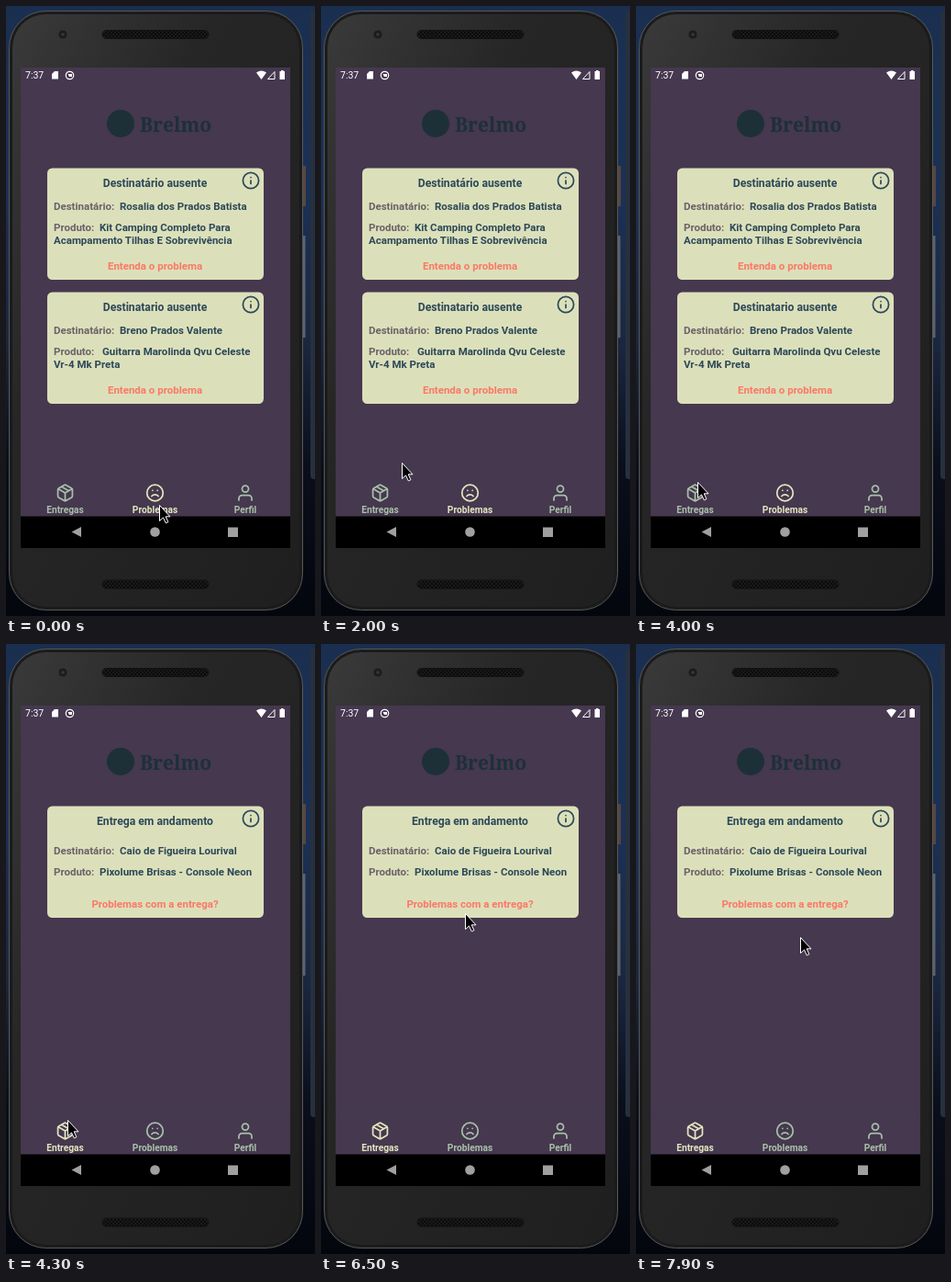
An HTML page for the animation above (8 s loop, 337 by 664 pixels).

```html
<!DOCTYPE html>
<html lang="pt">
<head>
<meta charset="utf-8">
<style>
html, body { margin: 0; width: 100%; height: 100%; overflow: hidden; background: #060b16; }
svg { display: block; }
text { font: bold 11.5px Roboto, sans-serif; fill: #2c4859; }
.title { font-size: 12.2px; text-anchor: middle; }
.label { fill: #6a6169; }
.link { fill: #fb7867; text-anchor: middle; }
.tab text { font-size: 10.2px; text-anchor: middle; fill: currentColor; }
.clock { font-weight: 400; font-size: 10.5px; fill: #fff; }
.brand { font: 900 21px "Noto Serif", serif; fill: #1d3038; }
.icon { fill: none; stroke: currentColor; stroke-width: 2; stroke-linecap: round; stroke-linejoin: round; }
</style>
</head>
<body>
<svg width="337" height="664" viewBox="0 0 337 664">
  <defs>
    <linearGradient id="sky" x2="0" y2="1">
      <stop stop-color="#1a2f50"/>
      <stop offset=".3" stop-color="#1b3155"/>
      <stop offset=".55" stop-color="#1b2740"/>
      <stop offset=".75" stop-color="#0a0f1b"/>
      <stop offset="1" stop-color="#03060d"/>
    </linearGradient>
    <linearGradient id="shell" x2="1" y2="1">
      <stop stop-color="#3a3a3a"/>
      <stop offset=".35" stop-color="#262626"/>
      <stop offset="1" stop-color="#1f1f1f"/>
    </linearGradient>
    <pattern id="mesh" width="4" height="4" patternUnits="userSpaceOnUse">
      <path d="M0 0h2v2h-2zM2 2h2v2h-2z" fill="#0b0b0b"/>
    </pattern>
  </defs>

  <rect width="337" height="664" fill="url(#sky)"/>
  <rect x="332" y="5" width="12" height="510" rx="4" fill="#26303f"/>
  <path d="M324 174h3v44h-3z" fill="#57473f"/>
  <path d="M324 250h2.5v111h-2.5z" fill="#5c636d"/>
  <rect x="3.500" y="5.500" width="320" height="652" rx="40" fill="#1c1c1c" stroke="#585858"/>
  <rect x="6.500" y="8.500" width="314" height="646" rx="37" fill="url(#shell)" stroke="#191919"/>
  <circle cx="62" cy="31" r="5" fill="#1c1c1c" stroke="#343434"/>
  <circle cx="62" cy="31" r="1.800" fill="#36383e"/>
  <g fill="#1a1a1a" stroke="#111">
    <rect x="105" y="26.500" width="116" height="9" rx="4.500"/>
    <rect x="105" y="625" width="116" height="9" rx="4.500"/>
  </g>
  <rect x="106" y="27" width="114" height="8" rx="4" fill="url(#mesh)"/>
  <rect x="106" y="626" width="114" height="8" rx="4" fill="url(#mesh)"/>

  <rect x="16" y="67" width="294" height="489" fill="#45384f"/>
  <rect x="16" y="515.500" width="294" height="1" fill="#413a52"/>
  <rect x="16" y="555.500" width="294" height="34.500"/>
  <g fill="#a0a0a0">
    <path d="M82 567v11l-10.500-5.500z"/>
    <circle cx="162.500" cy="572.500" r="5.300"/>
    <path d="M242 567.500h11v10.500h-11z"/>
  </g>

  <text class="clock" x="21" y="79">7:37</text>
  <g fill="#fff">
    <path d="M53 71h4v8.500h-7v-5.500z"/>
    <circle cx="69.500" cy="75.500" r="4.200" fill="none" stroke="#fff" stroke-width="1.200"/>
    <path d="M67.500 74h4.500v3h-3z"/>
    <path d="M273 72.500q5.500-4 11 0l-5.500 7.500z"/>
    <path d="M293 71.500v8h-7.500z" fill="none" stroke="#fff"/>
    <path d="M300 70h2.500v1h1.500v9h-5.500v-9h1.500z"/>
  </g>
  <circle cx="125" cy="128" r="15" fill="#1d3038"/>
  <text class="brand" x="146" y="136.500">Brelmo</text>

  <g id="problems"></g>
  <g id="deliveries"></g>
  <g id="tabs"></g>
  <path id="cursor" d="M.5 .5v17l4-3.600 2.800 6 2.600-1.200-2.700-5.900h4.800z" fill="#000" stroke="#fff"/>
</svg>
<script>
const $ = id => document.getElementById(id);
const dot = (x, y) => `M${x} ${y}h.01`;
const ring = r => `<circle cx="12" cy="12" r="${r}"/>`;
const icon = (x, y, scale, body) =>
  `<g class="icon" transform="translate(${x} ${y}) scale(${scale}) translate(-12 -12)">${body}</g>`;
const text = (x, y, content, type = '') => `<text x="${x}" y="${y}" class="${type}">${content}</text>`;

const info = ring(10) + `<path d="M12 16v-4${dot(12, 8)}"/>`;
const box = `<path d="M16.5 9.400 7.500 4.210M21 16V8a2 2 0 0 0-1-1.730l-7-4a2 2 0 0 0-2 0l-7 4A2 2 0 0 0 3 8v8
  a2 2 0 0 0 1 1.730l7 4a2 2 0 0 0 2 0l7-4A2 2 0 0 0 21 16zM3.270 6.960 12 12l8.730-5.040M12 22V12"/>`;
const frown = ring(10) + `<path d="M16 16s-1.500-2-4-2-4 2-4 2${dot(9, 9)}${dot(15, 9)}"/>`;
const user = '<path d="M20 21v-2a4 4 0 0 0-4-4H8a4 4 0 0 0-4 4v2"/><circle cx="12" cy="7" r="4"/>';

const card = (y, title, link, lines) => `<g transform="translate(0 ${y})">
  <rect x="45" y="-.5" width="236" height="121.500" rx="5.500" fill="#dce0ba"/>
  ${text(162.5, 20, title, 'title')}${lines}${text(162.5, 110, link, 'link')}
  <g color="#2c4859">${icon(267, 13, .86, info)}</g></g>`;
const recipient = (y, name) => text(52, y, 'Destinatário:', 'label') + text(124, y, name);
const product = (y, x, name, rest = '') =>
  text(52, y, 'Produto:', 'label') + text(x, y, name) + text(52, y + 13.5, rest);

$('problems').innerHTML =
  card(177, 'Destinatário ausente', 'Entenda o problema',
    recipient(45, 'Rosalia dos Prados Batista') +
    product(68, 102, 'Kit Camping Completo Para', 'Acampamento Tilhas E Sobrevivência')) +
  card(312, 'Destinatario ausente', 'Entenda o problema',
    recipient(45, 'Breno Prados Valente') +
    product(68, 105, 'Guitarra Marolinda Qvu Celeste', 'Vr-4 Mk Preta'));
$('deliveries').innerHTML =
  card(177, 'Entrega em andamento', 'Problemas com a entrega?',
    recipient(52, 'Caio de Figueira Lourival') +
    product(74.5, 102, 'Pixolume Brisas - Console Neon'));
$('tabs').innerHTML = [[64.5, 'Entregas', box], [162.5, 'Problemas', frown], [261, 'Perfil', user]]
  .map(([x, name, body]) => `<g class="tab">${icon(x, 530, .88, body)}${text(x, 551.5, name)}</g>`).join('');

// Pointer path: [time in tenths of a second, x, y]
const path = [
  [0, 167, 543], [1, 167, 543], [5, 155, 522], [7, 155, 522], [12, 180, 312], [16, 130, 376],
  [20, 88, 497], [24, 67, 508], [27, 67, 508], [28, 70, 511], [29, 70, 511], [30, 70, 512],
  [38, 70, 512], [40, 67, 518], [46, 67, 518], [55, 193, 231], [56, 167, 220], [57, 160, 217],
  [61, 143, 255], [64, 155, 292], [65, 157, 293], [69, 176, 400], [73, 147, 515],
  [74, 145, 520], [79, 179, 319]
];

function draw(now) {
  const tick = Math.floor(now % 8000 / 100);
  const next = Math.max(1, path.findIndex(([t]) => t >= tick));
  const [t0, x0, y0] = path[next - 1], [t1, x1, y1] = path[next];
  const k = (tick - t0) / (t1 - t0);
  $('cursor').setAttribute('transform', `translate(${x0 + (x1 - x0) * k} ${y0 + (y1 - y0) * k})`);

  const active = tick < 43 ? 1 : 0;
  $('problems').style.display = active ? '' : 'none';
  $('deliveries').style.display = active ? 'none' : '';
  [...$('tabs').children].forEach((tab, i) => tab.style.color = i === active ? '#e2e5bd' : '#a9bfa8');
  requestAnimationFrame(draw);
}
draw(performance.now());
</script>
</body>
</html>
```
